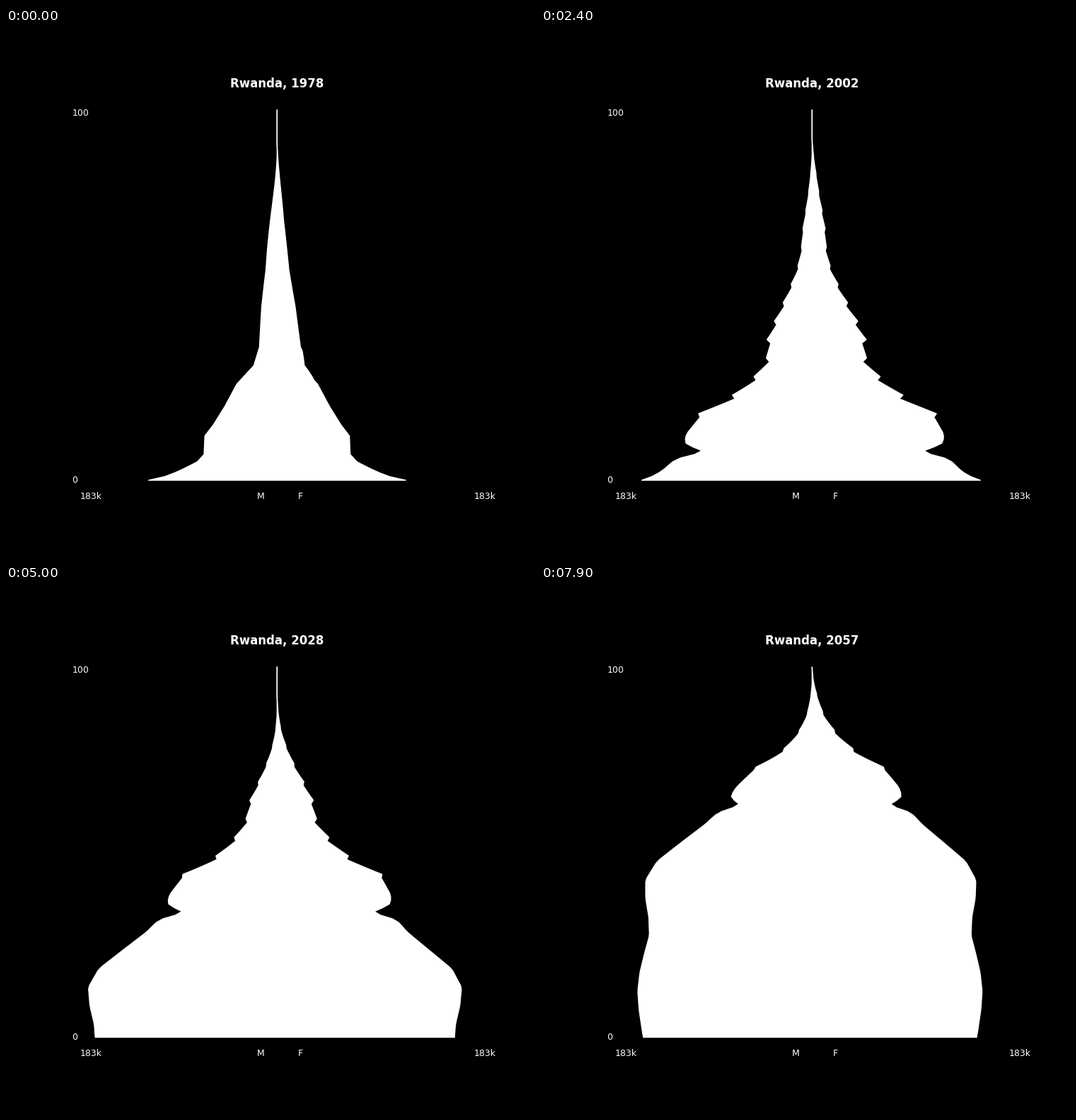
A matplotlib script for the animation above (8 s loop, 748x748 px).

```python
import numpy as np
import matplotlib.pyplot as plt
from matplotlib.animation import FuncAnimation

SIZE, DPI = 748, 100
FIRST, YEARS = 1978, 80
HALF = SIZE * .775 / 2          # half of the axes' width, so one unit is one pixel
EDGE = .7                       # half of the outline's thickness in pixels
AGES = np.arange(101)

# Men born, every fifth cohort counted by age in 2021 (negative if unborn)
COHORTS = np.arange(-38.5, 102, 5)
BIRTHS = [270, 275, 279.5, 281.7, 278.5, 271.6, 264, 266, 272.5, 275, 260, 226,
          191.5, 166, 161, 142, 94.5, 69, 53.5, 54, 46.3, 36.8, 28, 20.3,
          17, 18, 17, 16, 17]

# The older generations, by age in 1988
OLD_AGES = [-5, 0, 3, 9, 10, 12, 15, 17, 22, 25, 30, 36, 41, 46, 57, 67, 90]
OLD_BIRTHS = [216, 201, 187, 151, 154.5, 137, 108.5, 99.5, 98.5, 87, 71.5, 55.5,
              32.5, 25, 22.8, 18.5, 17]


def toll(age, year, female):
    """Gompertz mortality, easing off after 2030."""
    scale = .46 if female else .68
    return scale * np.exp(.097 * (age - 77) - .02 * (max(year, 2030) - 2057))


def early(year, female):
    age = AGES + 1988 - year
    born = np.interp(age, OLD_AGES, OLD_BIRTHS)
    if female:
        born = born * np.interp(age, [37, 45, 80], [1, 1.32, .8])
    return born * np.exp(-toll(AGES, year, female) - .0045 * (year - 1988))


def late(year, female):
    age = AGES + 2021 - year
    born = np.interp(age, COHORTS, BIRTHS)
    # losses of 1994: newborns, and a step at every five-year age band
    born *= 1 - .15 * np.exp(-((age - 26.8) / 1.4) ** 2)
    born *= np.where(age > 36, 1.05 - .025 * ((age - 37) % 5), 1)
    if female:
        born = born * (.975 + .22 / (1 + np.exp((36 - age) / 6)))
    rate = np.interp(age, [36, 42], [.0055, .0088]) if year < 2021 else .0036
    return born * np.exp(-toll(AGES, year, female) - rate * (year - 2021))


def half_width(year, female):
    u = np.clip((year - 1993) / 2, 0, 1)
    width = early(year, female) ** (1 - u) * late(year, female) ** u
    width = width * np.interp(year, [1993, 1995, 1998], [1, .82, 1])
    infant = .13 * max(0, 1 - (year - 1978) / 36)
    return np.maximum(width * (1 + infant * np.exp(-AGES)) - EDGE, 0)


def outline(year):
    left = np.column_stack([-half_width(year, False), AGES])
    right = np.column_stack([half_width(year, True), AGES])
    return np.vstack([left, right[::-1]])


fig, ax = plt.subplots(figsize=(SIZE / DPI, SIZE / DPI), dpi=DPI,
                       facecolor="black")
fig.subplots_adjust(left=.125, right=.9, bottom=.11, top=.88)
ax.set(xlim=(-HALF, HALF), ylim=(-5, 105))
ax.axis("off")


def label(x, y, text, size=9, **style):
    return ax.text(x, y, text, size=size, color="white", family="DejaVu Sans",
                   transform=ax.transAxes, **style)


for x, y, text in [(0, .94, "100"), (0, .04, "0"), (.02, 0, "183k"),
                   (.98, 0, "183k"), (.45, 0, "M"), (.55, 0, "F")]:
    label(x, y, text)
title = label(.5, 1.01, "", size=12, weight="bold", ha="center")
body, = ax.fill(*outline(FIRST).T, facecolor="white", edgecolor="white",
                linewidth=1, joinstyle="round")


def draw(frame):
    year = FIRST + frame
    title.set_text(f"Rwanda, {year}")
    body.set_xy(outline(year))
    return body, title


anim = FuncAnimation(fig, draw, frames=YEARS, interval=100, repeat=True,
                     repeat_delay=0)
plt.show()
```
